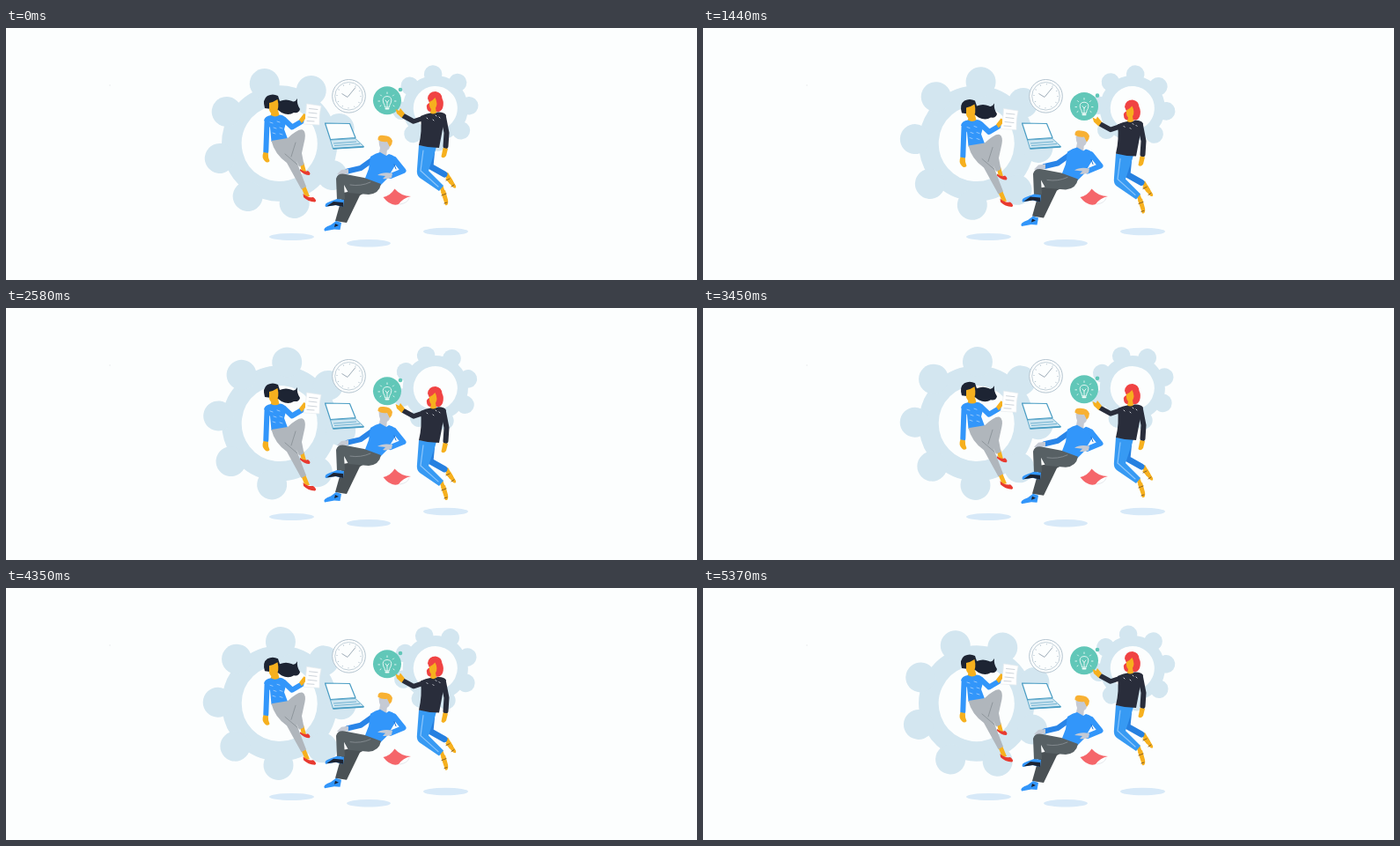
These frames come from a looping animation (785 by 286 pixels, 5.4 s). An HTML page:

```html
<!DOCTYPE html>
<html>
<head>
<meta charset="utf-8">
<style>
html, body { margin: 0; width: 100%; height: 100%; overflow: hidden; background: #fcfefe }
svg { display: block; width: 785px; height: 286px }
.limb { fill: none; stroke-linecap: round; stroke-linejoin: round }
.line { fill: none; stroke-linecap: round }
.gear { fill: #d3e6f0; stroke: #d3e6f0 }
.skin { fill: #f6b01e }
.blue { fill: #3296fa }
.navy { fill: #1d2433 }
.red { fill: #e83a30 }
.grey { fill: #c5cad4 }
</style>
</head>
<body>
<svg viewBox="0 0 785 286">
  <g id="big" class="gear"></g>
  <g id="small" class="gear"></g>
  <circle cx="118" cy="65" r=".7" fill="#e3e6e8"/>

  <g fill="#d7e9f8">
    <ellipse cx="324.500" cy="237" rx="25.500" ry="4"/>
    <ellipse cx="412" cy="244.300" rx="25" ry="4.300"/>
    <ellipse cx="499.500" cy="231" rx="25.500" ry="4.300"/>
  </g>

  <g id="clock" fill="none" stroke="#b4c4d0">
    <circle cx="389.500" cy="77.300" r="18.800" fill="#fcfefe"/>
    <circle cx="389.500" cy="77.300" r="15.800" stroke-width=".8"/>
    <circle cx="389.500" cy="77.300" r="13.500" stroke-width="1.500" stroke-dasharray=".8 6.270"/>
    <path d="M381.500 74.500L388 78.500L397 67.500" stroke="#93a3b0" stroke-width=".9"/>
  </g>

  <g stroke="#4a9dc4" stroke-linejoin="round">
    <path d="M362.500 108L390.500 108.500L397 124.500L368.500 126.500Z" fill="#fcfefe" stroke-width="1.200"/>
    <path d="M368.500 127L397 125.500L406.500 134.500L371.500 137Z" fill="#cfe6f1" stroke-width=".8"/>
    <path d="M372 131L398 129M373 133.500L402 131.500" stroke-width=".7"/>
    <path d="M371.500 136.800L406.500 134.800" stroke-width="1.800"/>
  </g>

  <path d="M447 200Q456 199 458 193" fill="none" stroke="#e6e9ed"/>
  <path d="M428.500 192Q437 190 441.500 182.500Q449 191 460 191Q451 193 446 200Q437 203 428.500 192Z" fill="#f5666a"/>

  <g id="writer">
    <path class="limb" d="M316 104L325 112.500L336 106" stroke="#3296fa" stroke-width="6"/>
    <path class="limb" d="M296.500 107L295.300 140" stroke="#3296fa" stroke-width="6"/>
    <path class="skin" d="M292.500 141L297.800 142Q297.500 147 299.500 151Q297 154 294 151Q290 147 292.500 141Z"/>
    <path class="skin" d="M302 94L309 93L311 101L300 102Z"/>
    <path class="blue" d="M293 105Q294 100 301 99Q306 102 311 98.500Q317 99 319 104L316 115L320.500 127L301.500 129L300 113Z"/>
    <path class="line" d="M300 107l3 1M308 106l3 1M304 113l3 1M311 113l3 1M303 119l3 1M311 120l3 1" stroke="#93c6fb"/>
    <path class="navy" d="M294 91Q291 81 297 77Q303 74 309 77L311 83Q318 80 325 83Q328 85 331 80Q330 86 334 92Q333 97 327 96Q321 100 313 96L309 93Z"/>
    <path class="skin" d="M299 85Q304 84 308.500 81Q311 91 306.500 97Q301 99 299 93Z"/>
    <path class="skin" d="M333.500 153L338 152L341 163L336 163ZM335 180L340 179L345 191L340 192Z"/>
    <path d="M301.500 128L320 125Q332 114 337 115.500Q341 118 339.500 126L336 142L338.500 155L333 157.500L329.500 150L341 180L335.500 183L319 153Q305 143 301.500 128Z" fill="#b0b6bc"/>
    <path class="line" d="M317 143L331 155M324 146L329 130" stroke="#8b9298" stroke-width=".9"/>
    <path class="red" d="M334 160Q339 164 343 162Q347 165 344.500 167Q339 167 334 162ZM337.500 188Q342 193 349 192Q354 196 351 197.500Q343 197 338 192Z"/>
    <path d="M341.500 86L358 88.500Q355.500 98 356 110L338 109Q341.500 96 341.500 86Z" fill="#fff" stroke="#e8ecf0" stroke-width=".7"/>
    <path class="line" d="M344.500 91.500l9.500 1M344 96l9 1M343 101l10 1M342 105.500l8 .5" stroke="#cdd3da"/>
    <path class="skin" d="M333 104L338.500 97L340 98L340 103L336 108Z"/>
  </g>

  <g id="sitter">
    <path class="limb" d="M417 149L403 159L388 162.500" stroke="#2985e8" stroke-width="6"/>
    <path class="grey" d="M389 160L389 165L382 167L376 166L381 161Z"/>
    <path class="grey" d="M425 136L433 137L432 147L423 146Z"/>
    <path class="blue" d="M414 146Q420 142 425 141L432 145L435 143Q443 145 445 151L433 171L425 179L407 173L412 160Z"/>
    <path class="limb" d="M441 149L451.500 162L437 168" stroke="#3296fa" stroke-width="6"/>
    <path class="line" d="M441 155L443 160" stroke="#1b6fd2"/>
    <path class="grey" d="M439 165L438 170Q431 172 428 171L431 168L422 167Q428 163 439 165Z"/>
    <path class="grey" d="M423.500 128L435 127Q438.500 138 431 140Q424 141 423.500 128Z"/>
    <path d="M422.500 127Q422 121 429 122Q437 122 439 128Q439 132 436 135L433 129Q427 130 422.500 127Z" fill="#f8b133"/>
    <path d="M420 180L402 190L387 221L374 219L383 187Z" fill="#4a5155"/>
    <path d="M407 170L426 177Q424 188 412 189L389 187L384 178L385 194L376 195L375 171Q377 164 386 166Z" fill="#576064"/>
    <path class="line" d="M391 178Q403 180 414 175" stroke="#8d9498" stroke-width=".8"/>
    <path class="blue" d="M376 194L384 195L383 203L374 201L363 203Q361 199 368 197ZM375 219L381 221L379.500 229L373 228.500L362 230.500Q359 227 369 223.500Z"/>
    <path class="navy" d="M372 197L383 198L383 203L375 201L364 202.500ZM374 222L378 224L373 226Z"/>
  </g>

  <g id="idea">
    <circle cx="433" cy="82.300" r="16" fill="#61c7b8"/>
    <circle cx="448" cy="70" r="2.300" fill="#61c7b8"/>
    <g class="line" stroke="#f2fbf9" stroke-width=".9">
      <path d="M430.500 89.500Q430.500 87 428.800 85Q426.500 78 433 77.500Q439.500 78 437.200 85Q435.500 87 435.500 89.500ZM431 82l2 2.500l2-2.500M433 84.500v5"/>
      <path d="M431.500 91.500h3" stroke-width="2"/>
      <path d="M433 74.500v-1.500M426.500 77l-1-1M439.500 77l1-1M424.500 83h-1.500M441.500 83h1.500M426 88l-1 .7M440 88l1 .7"/>
    </g>
  </g>

  <g id="thinker">
    <path class="limb" d="M475 102L463 106L452 100" stroke="#292d3b" stroke-width="5.500"/>
    <path class="skin" d="M453 97L449.500 102L444 97L442.500 92L446.500 94L448 91Z"/>
    <path class="limb" d="M497 101L500.500 119L499.500 134" stroke="#292d3b" stroke-width="6"/>
    <path class="skin" d="M496.500 136L502 137L500 145Q497 149 494.500 146Z"/>
    <path class="skin" d="M498 166L502 164L508 174L504 177ZM492 180L496 178L500 189L496 190Z"/>
    <path class="limb" d="M484 137L482 157L498 166" stroke="#2680e0" stroke-width="7"/>
    <path d="M469 133L489 135L480 162L497 179L492 185L470 170Q466 167 467 160Z" fill="#379af3"/>
    <path class="line" d="M474 139L471 162L491 180" stroke="#8cc6fb" stroke-width="1.200"/>
    <path d="M479 80Q480 72 488 72Q495 73 495.500 80Q498 85 496 91Q494 96 488 95Q478 97 478 90Q477 87 481 85Z" fill="#f04343"/>
    <path class="skin" d="M481 84Q485 82 487.500 79Q491 86 488 91L489.500 99L481.500 99L483 92Q480.500 90 481 84Z"/>
    <path d="M471 100Q477 97 482 96.500Q486 99 490 95.500Q498 95 500 99L496 115L492 136Q480 136 469 133Q473 117 471 100Z" fill="#292d3b"/>
    <path class="line" d="M478 102l1 1M485 104l1 1M492 101l1 1M488 99l1 1" stroke="#d5d8df"/>
    <path class="skin" d="M499 171L505 169L511 179Q512 183 508 181ZM494 186L499 184L502 195Q503 202 499 201Z"/>
    <path class="line" d="M500 173l4 -2M506 180l3 -2M495 190l5 -2M498 199l3 -1" stroke="#8a6224"/>
  </g>
</svg>
<script>
const $ = id => document.getElementById(id);
const LOOP = 5400, STEP = 30;

// Ring with eight round teeth, centred on the origin
function gear(id, inner, outer, reach, tooth) {
  let parts = `<circle r="${(inner + outer) / 2}" fill="none" stroke-width="${outer - inner}"/>`;
  for (let i = 0; i < 8; i++) {
    const a = i * Math.PI / 4;
    parts += `<circle cx="${reach * Math.cos(a)}" cy="${reach * Math.sin(a)}" r="${tooth}" stroke="none"/>`;
  }
  $(id).innerHTML = parts;
}

const turn = (id, x, y, angle) => $(id).setAttribute('transform', `translate(${x} ${y}) rotate(${angle})`);
const shift = (id, y) => $(id).setAttribute('transform', `translate(0 ${y.toFixed(2)})`);

gear('big', 43, 65.5, 70, 17);
gear('small', 25, 37, 38.5, 10.3);

function draw(now) {
  const n = Math.floor(now % LOOP / STEP);
  const bob = (1 - Math.cos(2 * Math.PI * n * STEP / LOOP)) / 2;
  turn('big', 310.7, 131, 31 + 6 * n);
  turn('small', 487.8, 91, 41 + 3 * n);
  shift('writer', 10 * bob);
  shift('sitter', -10 * bob);
  shift('idea', 12 * bob);
  shift('thinker', 17 * bob);
}

const start = performance.now();
function tick() {
  draw(performance.now() - start);
  requestAnimationFrame(tick);
}
tick();
</script>
</body>
</html>
```
